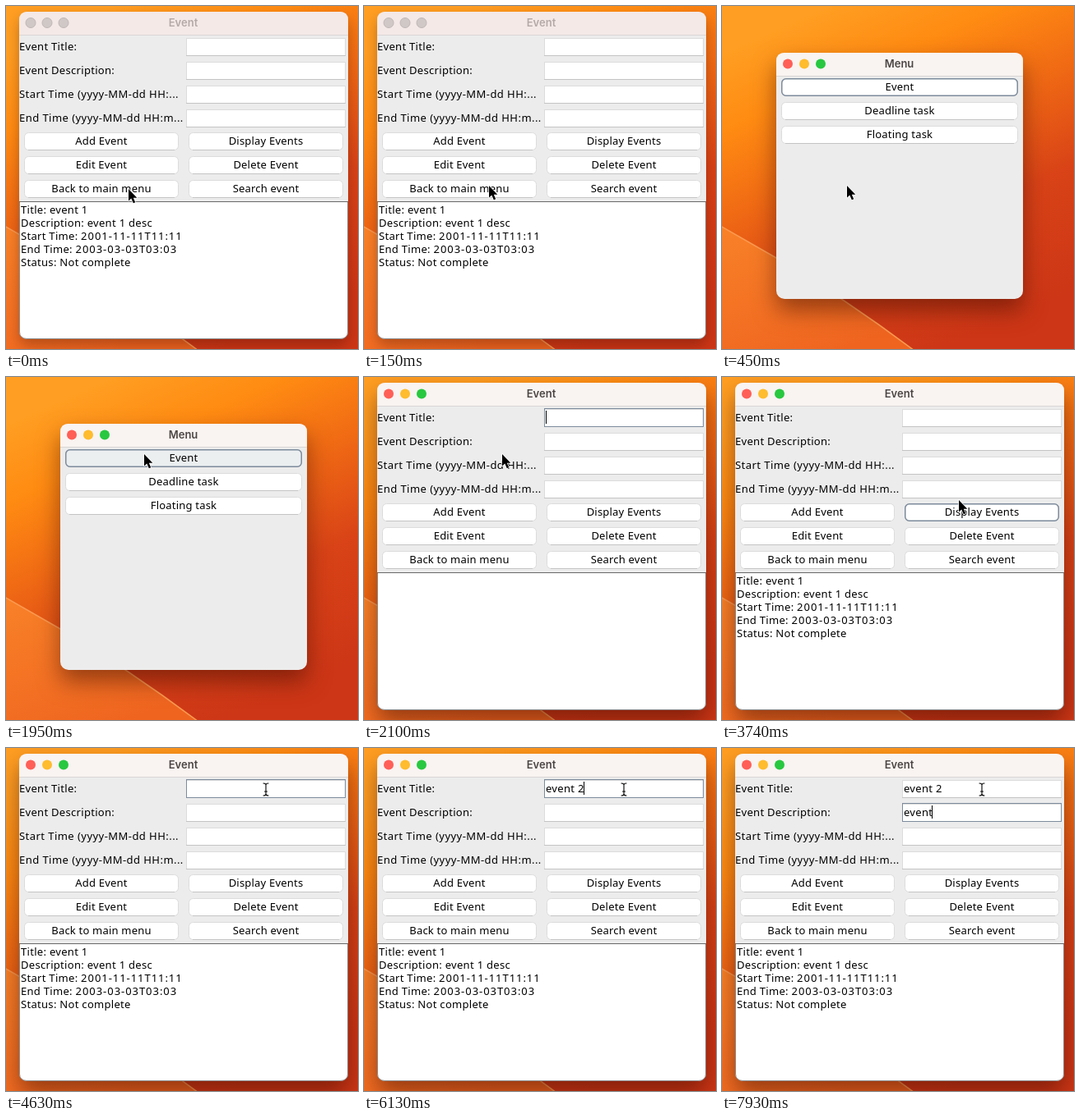
An HTML page that plays this animation: 428 by 418 pixels, repeating every 8 s.

```html
<!DOCTYPE html>
<html lang="en">
<head>
<meta charset="utf-8">
<title>Event planner</title>
<style>
  html, body { margin: 0; width: 100%; height: 100%; overflow: hidden; }
  svg { display: block; width: 428px; height: 418px; }
  text { font: 13px "Noto Sans", sans-serif; letter-spacing: .3px; fill: #000; white-space: pre; }
  .mid { text-anchor: middle; letter-spacing: .2px; }
  .wide { letter-spacing: .45px; }
  .date { letter-spacing: .95px; }
  .title { font: 600 13px Inter, sans-serif; letter-spacing: 0; text-anchor: middle; fill: #4b4645; }
  .frame { fill: #ececec; filter: drop-shadow(0 14px 14px rgba(60, 10, 0, .5)); }
  .box { fill: #fff; stroke: #dcdcdc; }
  .edge { stroke: #c4c4c4; }
  .ring { fill: none; stroke: #7d8b9c; visibility: hidden; }
  .focus .ring { visibility: visible; }
  .press .box { fill: #eceff0; }
  .inactive .light { fill: #cfc8c7; stroke: #bfb7b6; }
  .inactive .title { fill: #b4a9a7; }
  .inactive .bar { fill: #f4e9e7; }
  .inactive .frame { filter: drop-shadow(0 8px 8px rgba(60, 10, 0, .32)); }
</style>
</head>
<body>
<svg viewBox="0 0 428 418">
  <defs>
    <linearGradient id="sky" gradientUnits="userSpaceOnUse" x1="130" y1="0" x2="310" y2="400">
      <stop offset="0" stop-color="#ff9e22"/>
      <stop offset=".2" stop-color="#ff8b12"/>
      <stop offset=".42" stop-color="#f06a14"/>
      <stop offset=".68" stop-color="#d94317"/>
      <stop offset="1" stop-color="#cd3616"/>
    </linearGradient>
    <linearGradient id="dune" x1="0" y1="0" x2=".6" y2="1">
      <stop offset="0" stop-color="#f98228"/>
      <stop offset="1" stop-color="#ef6520"/>
    </linearGradient>
  </defs>
  <rect width="428" height="418" fill="url(#sky)"/>
  <path d="M-2 268 L66 307 Q150 357 234 420 H-2Z" fill="url(#dune)" stroke="#fb9a50" stroke-width="1.5"/>
  <g id="menu"></g>
  <g id="event"></g>
  <g id="pointer">
    <path id="arrow" d="M0 0V14.6L3.3 11.6L5.8 17.2L8.2 16.2L5.8 10.7H10.3Z" stroke="#fff" stroke-width="1.4" paint-order="stroke" stroke-linejoin="round"/>
    <g id="beam" fill="none" stroke-linecap="round">
      <path d="M-3 -7Q0 -7 0 -5Q0 -7 3 -7M0 -5V6M-3 8Q0 8 0 6Q0 8 3 8M-1.5 3H1.5" stroke="#fff" stroke-width="2.6"/>
      <path d="M-3 -7Q0 -7 0 -5Q0 -7 3 -7M0 -5V6M-3 8Q0 8 0 6Q0 8 3 8M-1.5 3H1.5" stroke="#000" stroke-width="1.1"/>
    </g>
  </g>
</svg>
<script>
const LOOP = 8000, ROW = 29;
const $ = id => document.getElementById(id);

const windowFrame = (x, y, w, h, title) => `
  <rect class="frame" x="${x}" y="${y}" width="${w}" height="${h}" rx="10"/>
  <path class="bar" fill="#f9f3f1" d="M${x} ${y + 28}v-18q0 -10 10 -10h${w - 20}q10 0 10 10v18z"/>
  <path d="M${x} ${y + 28.5}h${w}" stroke="#dad6d5"/>
  ${['#ff5f57', '#febc2e', '#28c840'].map((color, i) =>
    `<circle class="light" cx="${x + 14 + 20 * i}" cy="${y + 13.5}" r="6" fill="${color}"/>`).join('')}
  <text class="title" x="${x + w / 2 - .5}" y="${y + 18}">${title}</text>`;

const button = (id, x, y, w, label) => `
  <g id="${id}">
    <rect class="box" x="${x + .5}" y="${y + .5}" width="${w - 1}" height="21" rx="5"/>
    <path class="edge" d="M${x + 5} ${y + 21.5}h${w - 10}"/>
    <rect class="ring" x="${x + .75}" y="${y + .75}" width="${w - 1.5}" height="20.5" rx="5" stroke-width="1.5"/>
    <text class="mid" x="${x + w / 2}" y="${y + 15}">${label}</text>
  </g>`;

const field = (id, y) => `
  <g id="${id}">
    <rect class="box" x="219.5" y="${y + .5}" width="193" height="21"/>
    <path class="edge" d="M219 ${y + 21.5}h194"/>
    <rect class="ring" x="219.5" y="${y - .5}" width="193" height="22"/>
    <text x="221" y="${y + 15}"></text>
    <rect class="caret" y="${y + 2}" width="1" height="16"/>
  </g>`;

const labels = ['Event Title:', 'Event Description:', 'Start Time (yyyy-MM-dd HH:...', 'End Time (yyyy-MM-dd HH:m...'];
const fields = ['title', 'desc', 'start', 'end'];
const actions = [['Add Event', 'Display Events'], ['Edit Event', 'Delete Event'], ['Back to main menu', 'Search event']];
const details = ['Title: event 1', 'Description: event 1 desc',
  'Start Time: <tspan class="date">2001-11-11T11:11</tspan>',
  'End Time: <tspan class="date">2003-03-03T03:03</tspan>', 'Status: Not complete'];

$('menu').innerHTML = windowFrame(66, 57, 300, 300, 'Menu') +
  ['Event', 'Deadline task', 'Floating task'].map((s, i) => button('menu' + i, 72, 88 + ROW * i, 288, s)).join('');
$('menu0').classList.add('focus');

$('event').innerHTML = windowFrame(16, 7, 400, 399, 'Event') +
  labels.map((s, i) => `<text class="${i > 1 ? 'wide' : ''}" x="16" y="${54 + ROW * i}">${s}</text>`).join('') +
  fields.map((id, i) => field(id, 39 + ROW * i)).join('') +
  actions.map((pair, r) => pair.map((s, c) =>
    button(`action${r}${c}`, 22 + 200 * c, 154 + ROW * r, 188, s)).join('')).join('') +
  `<path d="M16.5 238.5H415.5V397Q415.5 405.5 406 405.5H26Q16.5 405.5 16.5 397Z" fill="#fff" stroke="#8c8c8c"/>
   <path d="M16 238.5H416" stroke="#686868"/>
   <g id="details">${details.map((s, i) => `<text x="18" y="${253 + 16 * i}">${s}</text>`).join('')}</g>`;

// Each track lists [start time, value...]; values hold until the next entry.
const tracks = {
  view: [[0, 'inactive'], [450, 'menu'], [2100, 'event']],
  pointer: [[0, 149, 223], [150, 152, 219], [1200, 152, 212], [1350, 154, 190], [1500, 158, 150],
    [1650, 163, 118], [1800, 167, 99], [1950, 168, 94], [2250, 163, 98], [2400, 146, 118],
    [2550, 135, 142], [2700, 160, 162], [2850, 220, 171], [3000, 275, 167], [3150, 285, 160],
    [3600, 288, 150], [3750, 297, 120], [3900, 308, 80], [4050, 315, 56], [4190, 316, 50]],
  press: [[0, ''], [1950, 'menu0'], [2100, ''], [3300, 'action01'], [3450, '']],
  focus: [[0, ''], [2100, 'title'], [3300, 'action01'], [4340, 'title'], [6580, 'desc']],
  caret: [[0, false], [2100, true], [2550, false], [3000, true], [3300, false], [4340, true],
    [4630, false], [5080, true], [7030, false], [7480, true]],
  details: [[0, true], [450, false], [3450, true]],
  title: [[0, ''], [5080, 'e'], [5230, 'eve'], [5830, 'even'], [5980, 'event '], [6130, 'event 2']],
  desc: [[0, ''], [7480, 'e'], [7630, 'ev'], [7780, 'even'], [7930, 'event']]
};
const at = (name, t) => tracks[name].findLast(entry => entry[0] <= t).slice(1);
const show = (el, on) => { el.style.display = on ? '' : 'none'; };

function draw(t) {
  const [view] = at('view', t), [x, y] = at('pointer', t);
  const [focus] = at('focus', t), [press] = at('press', t), [caret] = at('caret', t);
  const inMenu = view === 'menu';
  show($('menu'), inMenu);
  show($('event'), !inMenu);
  $('event').classList.toggle('inactive', view === 'inactive');
  show($('details'), at('details', t)[0]);

  for (const id of ['title', 'desc', 'action01']) $(id).classList.toggle('focus', id === focus);
  for (const id of ['menu0', 'action01']) $(id).classList.toggle('press', id === press);
  for (const id of fields) {
    const text = $(id).querySelector('text'), bar = $(id).querySelector('.caret');
    const value = tracks[id] ? at(id, t)[0] : '';
    if (text.textContent !== value) text.textContent = value;
    const width = value && !inMenu ? text.getComputedTextLength() : 0;
    bar.setAttribute('x', Math.max(221, Math.floor(220.5 + width)));
    show(bar, caret && id === focus);
  }

  const overField = !inMenu && x >= 219 && y >= 39 && y < 148 && (y - 39) % ROW < 22;
  show($('beam'), overField);
  show($('arrow'), !overField);
  $('pointer').setAttribute('transform', `translate(${x} ${y})`);
}

const begin = performance.now();
function tick() {
  draw((performance.now() - begin) % LOOP);
  requestAnimationFrame(tick);
}
tick();
</script>
</body>
</html>
```
